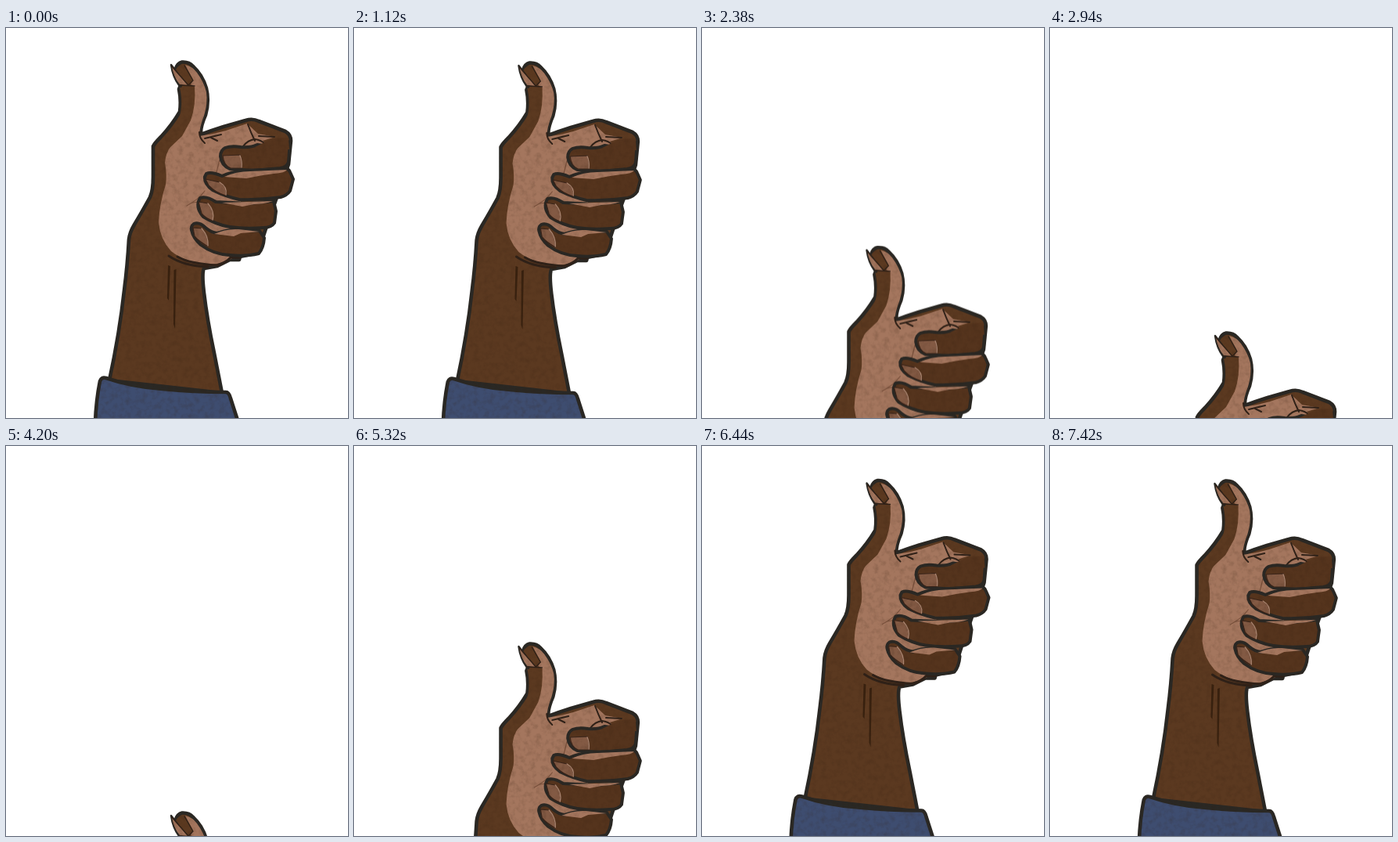
Recreate the animation shown at these times as an HTML page without scripts. Size 437 by 498 pixels, loop 7560 ms.

```html
<!DOCTYPE html>
<html lang="en">
<head>
<meta charset="utf-8">
<title>Thumbs up</title>
<style>
  html, body { margin: 0; width: 100%; height: 100%; overflow: hidden; background: #fff; }
  svg { display: block; width: 100%; height: 100%; }

  .ink { stroke: #2a2824; stroke-width: 4.6; stroke-linejoin: round; stroke-linecap: round; }
  .skin { fill: #5b3920; }
  .finger { fill: #55341d; stroke-width: 4; }
  .palm { fill: #a4765e; }
  .nail { fill: #835a44; stroke: #39241a; stroke-width: 1.2; stroke-linejoin: round; }
  .shine { fill: none; stroke: #ad8670; stroke-width: 1.4; stroke-linecap: round; }
  .line { fill: none; stroke: #2f2118; stroke-width: 2; stroke-linecap: round; stroke-linejoin: round; }
  .thin { stroke-width: 1.4; }
  .faint { fill: none; stroke: #7b523d; stroke-width: 1.2; stroke-linecap: round; }
  .tendon { fill: #38210f; }
  .sleeve { fill: #3e4d70; }

  /* 54 drawings per loop, each held for 140 ms */
  .rise { animation: rise 7.56s -2ms infinite step-end; }
  @keyframes rise {
    0%, 14.8148% { transform: translateY(0); }
    16.6666% { transform: translateY(17px); animation-timing-function: steps(3); }
    22.2222% { transform: translateY(84px); }
    24.074%  { transform: translateY(109px); animation-timing-function: steps(3); }
    29.6296% { transform: translateY(208px); animation-timing-function: steps(5); }
    38.8888% { transform: translateY(346px); animation-timing-function: steps(3); }
    44.4444% { transform: translateY(425px); }
    46.2962% { transform: translateY(480px); }
    55.5555% { transform: translateY(425px); animation-timing-function: steps(3); }
    61.1111% { transform: translateY(346px); animation-timing-function: steps(5); }
    70.3703% { transform: translateY(208px); animation-timing-function: steps(3); }
    75.9259% { transform: translateY(109px); }
    77.7777% { transform: translateY(84px); animation-timing-function: steps(3); }
    83.3333% { transform: translateY(17px); }
    85.1851%, 100% { transform: translateY(0); }
  }

  /* three slightly different takes alternate, so the drawing boils */
  .take { visibility: hidden; animation: take .42s -2ms infinite step-end; }
  .two { animation-delay: -282ms; }
  .three { animation-delay: -142ms; }
  @keyframes take {
    0% { visibility: visible; }
    33.3333%, 100% { visibility: hidden; }
  }
</style>
</head>
<body>
<svg viewBox="0 0 437 498" preserveAspectRatio="none">
  <defs>
    <filter id="grain" filterUnits="userSpaceOnUse" x="90" y="20" width="300" height="500" color-interpolation-filters="sRGB">
      <feTurbulence type="fractalNoise" baseFrequency=".15" numOctaves="3" seed="4"/>
      <feColorMatrix values="0 0 0 0 .2  0 0 0 0 .12  0 0 0 0 .06  .4 0 0 0 -.17"/>
      <feComposite operator="in" in2="SourceAlpha" result="spots"/>
      <feMerge><feMergeNode in="SourceGraphic"/><feMergeNode in="spots"/></feMerge>
    </filter>

    <g id="hand">
      <!-- thumbnail edge -->
      <path class="palm" stroke="#2a2824" stroke-width="2.4" stroke-linejoin="round" d="M211 47 L218 56 L232 73 L221 73 Q213 62 211 47 Z"/>

      <!-- arm, thumb and fist -->
      <path class="ink skin" d="M132 450 Q145 390 151 335 Q155 305 157 270 Q158 261 164 251 Q177 229 184 216 Q188 207 188 190 L188 151
        Q190 147 198 139 Q212 124 222 107 Q224 92 221 78 L223 73 L217 52 Q219 45 225 43.500 Q234 43 239 49
        Q251 60 256 77 Q260 94 255 111 Q248 127 249 136 Q262 131 278 126 L306 118 Q315 115 323 119 L357 132
        Q364 136 364 144 L361 174 L334 250 L322 287 L299 292 L298 296 L286 296 L270 304 L253 307
        Q250 313 253 338 Q257 372 266 415 L276 466 Z"/>

      <!-- light side -->
      <path class="palm" d="M229 47 Q238 49 244 57 Q253 69 256 82 Q258 96 253 112 Q247 127 247 138 Q262 136 281 131 L308 122
        L322 135 L344 139 L328 144 L335 150 L300 185 L300 225 L290 258 L280 291 L293 292 Q278 301 260 302
        Q228 299 211 285 Q197 270 195 248 Q196 225 204 200 Q206 188 203 172 Q204 160 211 150
        Q222 136 235 119 Q241 101 241 75 L236 72 L239 66 Z"/>
      <path class="skin" d="M222 76 L241 75 Q243 98 236 118 L225 138 L207 155 L205 146 L214 128 Q229 108 222 76 Z"/>
      <path class="palm" d="M212 49 L218 56 L232 73 L222 72 Q214 62 212 49 Z"/>
      <path class="skin" d="M217 53 Q221 46 228 48 L239 67 L233 73 Z"/>
      <path class="line thin" d="M212 49 L218 56 L233 73 L239 67 L228 48 M222 73 L241 74"/>
      <path class="line" d="M247 133 Q247 141 254 147 M254 141 L275 136 M262 140 L270 144"/>
      <path class="line" d="M309 123 Q313 134 318 144 M303 151 Q309 143 318 142 Q326 143 331 148 M323 138 L343 139"/>
      <path class="faint" d="M231 227 Q246 219 254 208 M268 188 L273 168 M238 223 L248 222"/>

      <!-- wrist -->
      <path class="line" style="stroke-width:3" d="M208 291 Q227 304 258 305 M219 292 Q234 301 270 303 Q282 299 287 293 L299 293"/>
      <path class="tendon" d="M207 303 L210 304 L208 348 L206 345 Z M214.500 309 L217.500 308 L216 384 L214 378 Z"/>

      <!-- fingers, from the top -->
      <path class="ink finger" d="M280 153 Q288 150 300 152 Q313 153 321 149 Q337 152 350 149 L363 145 L361 171 Q359 178 350 179 L316 182
        L286 180 Q275 175 274 164 Q274 156 280 153 Z"/>
      <path class="finger" d="M318 152 L341 141 L361 140 L362 155 L330 157 Z"/>
      <path class="nail" d="M277 163 L299 162 Q302 170 301 179 L287 179 Q278 175 277 163 Z"/>
      <path class="shine" d="M299 163 Q302 170 301 178"/>

      <path class="ink finger" d="M256 186 Q262 183 276 189 Q287 184 304 182 L355 180 Q361 179 363 184 L367 193 L363 208
        Q359 214 351 216 Q325 220 298 219 Q280 215 264 207 Q253 199 254 190 Z"/>
      <path class="palm" d="M279 190 Q294 183 312 183 L359 181 Q357 185 342 186 Q326 188 307 192 Z"/>
      <path class="nail" d="M255 193 L273 197 Q283 203 281 214 Q267 210 259 201 Z"/>
      <path class="shine" d="M273 197 Q283 203 281 213"/>

      <path class="ink finger" d="M248 217 Q256 214 268 222 L310 224 L342 221 L345 234 L343 249 Q339 255 329 255 Q306 257 286 254
        Q268 251 252 241 Q241 228 248 217 Z"/>
      <path class="palm" d="M276 223 L341 221 Q330 225 317 225 L302 228 Z"/>
      <path class="nail" d="M246 222 L258 224 Q267 234 264 246 Q255 243 250 237 Z"/>
      <path class="shine" d="M258 224 Q267 234 264 245"/>

      <path class="ink finger" d="M240 250 Q247 247 255 255 Q262 261 270 262 Q284 257 297 258 L324 259 L330 268 Q329 281 323 288
        Q307 292 286 290 Q265 289 249 277 Q239 268 237 258 Q236 253 240 250 Z"/>
      <path class="palm" d="M266 263 Q281 256 297 257 L324 260 L300 262 L291 266 Z"/>
      <path class="nail" d="M239 255 L250 256 Q259 266 258 279 Q246 272 241 266 Z"/>
      <path class="shine" d="M250 256 Q259 266 258 278"/>

      <!-- cuff -->
      <path class="ink sleeve" d="M114 504 Q115 476 120 451 Q122 445 128 447 Q160 458 200 461 Q240 465 281 465 Q285 465 287 473 L297 504 Z"/>
    </g>
  </defs>

  <g class="rise">
    <g class="take"><use href="#hand" filter="url(#grain)"/></g>
    <g class="take two"><use href="#hand" filter="url(#grain)" transform="translate(-.5 .5)"/></g>
    <g class="take three"><use href="#hand" filter="url(#grain)" transform="translate(.3 1) scale(.996 1)"/></g>
  </g>
</svg>
</body>
</html>
```
